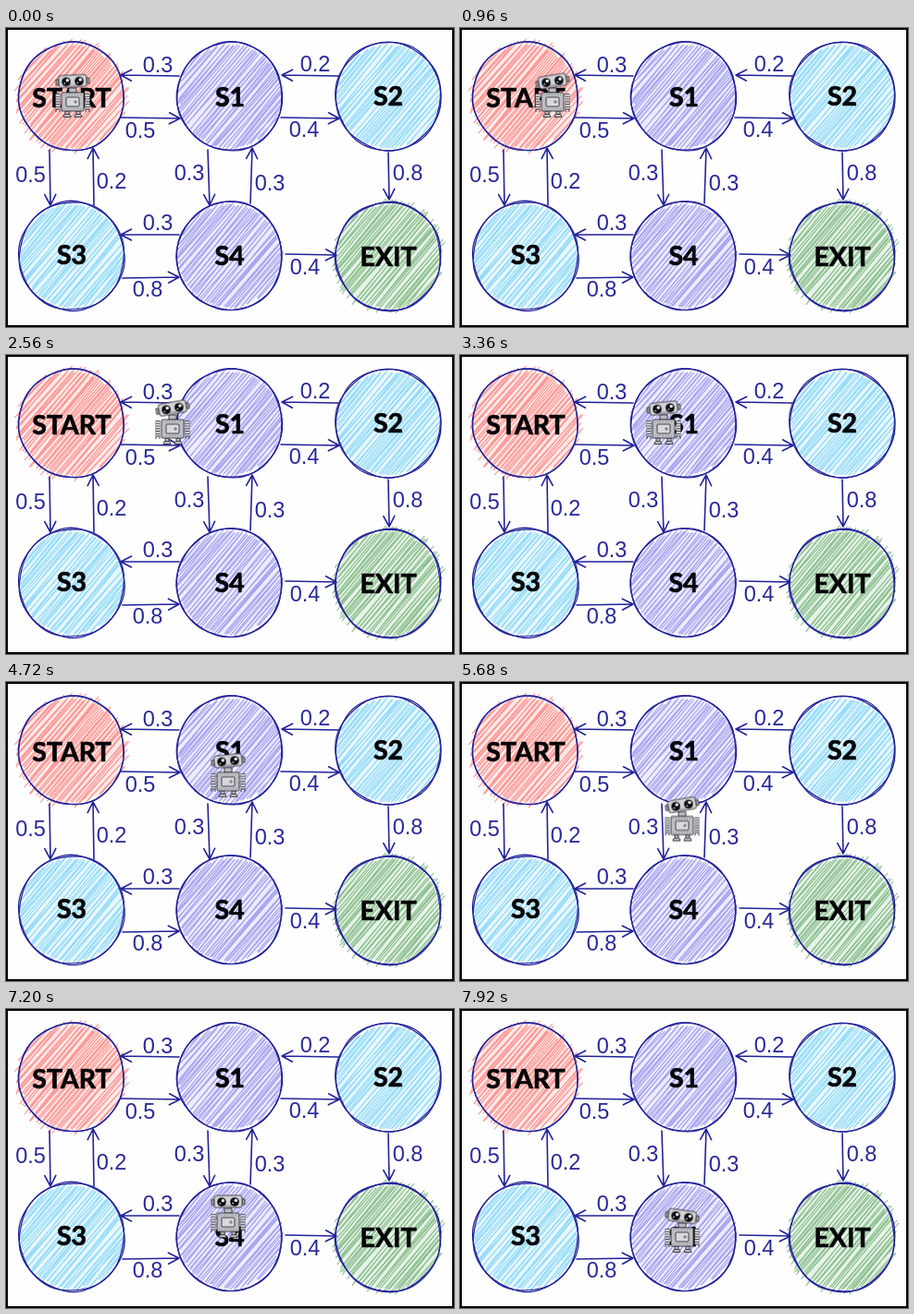
Write an HTML page that moves like this. It is 484 by 324 pixels and loops after 8 s.

```html
<!DOCTYPE html>
<html lang="en">
<head>
<meta charset="utf-8">
<title>State diagram</title>
<style>
html, body { margin: 0; width: 100%; height: 100%; overflow: hidden; background: #fefefe; }
svg { display: block; width: 484px; height: 324px; }
.ink { fill: none; stroke: #22229a; stroke-width: 1.6; stroke-linecap: round; stroke-linejoin: round; }
.ring { stroke-width: 1.3; }
.hatch { fill: none; stroke-width: 1.3; stroke-linecap: round; opacity: .55; }
text { text-anchor: middle; }
.state { font: 700 28.5px Lato, "Open Sans", sans-serif; fill: #050508; stroke: #050508; stroke-width: .7; }
.prob { font: 23.5px "Liberation Sans", Arial, sans-serif; fill: #29299a; }
#robot { animation: walk 8s -5ms infinite; }
#head { animation: tilt 8s -5ms infinite; }
@keyframes walk {
  0% { transform: translate(72px, 80px); animation-timing-function: step-end; }
  5% { transform: translate(72px, 80px); animation-timing-function: steps(42); }
  47% { transform: translate(240px, 80px); animation-timing-function: step-end; }
  52% { transform: translate(240px, 80px); animation-timing-function: steps(42); }
  94%, 100% { transform: translate(240px, 247px); animation-timing-function: step-end; }
}
@keyframes tilt {
  0% { transform: rotate(-3deg); animation-timing-function: steps(23); }
  23% { transform: rotate(-15deg); animation-timing-function: steps(19); }
  42% { transform: rotate(-6deg); animation-timing-function: steps(17); }
  59% { transform: rotate(-6deg); animation-timing-function: steps(12); }
  71% { transform: rotate(-10deg); animation-timing-function: steps(12); }
  83% { transform: rotate(-8deg); animation-timing-function: steps(16); }
  99%, 100% { transform: rotate(8deg); animation-timing-function: step-end; }
}
</style>
</head>
<body>
<svg viewBox="0 0 484 324">
  <g id="diagram"></g>
  <g id="robot" stroke="#34343c" stroke-width=".9">
    <g fill="#bcbcc2">
      <rect x="-4" y="-15" width="8" height="5"/>
      <path d="M-8 10h4v4h-4zM4 10h4v4h-4z"/>
      <path d="M-10 16.5q0-3 2-3h4q2 0 2 3zM2 16.5q0-3 2-3h4q2 0 2 3z"/>
    </g>
    <g fill="none">
      <path d="M-16 -9V8M16 -9V8" stroke="#55555d" stroke-width="5"/>
      <path d="M-16 -8V8M16 -8V8" stroke="#dcdce0" stroke-width="4.4" stroke-dasharray="1.7 1.1"/>
      <path d="M-18 11v-3h4v3M14 11v-3h4v3"/>
    </g>
    <rect x="-12" y="-10" width="24" height="20" rx="1" fill="#bebec4"/>
    <rect x="-7" y="-5" width="14" height="10" rx="1" fill="#d8d8dd"/>
    <path d="M1 0h4M3 -2v4" stroke="#66666e"/>
    <path d="M-10 -7.5h20M-10 7.5h20" stroke="#8a8a92" stroke-dasharray="1 2"/>
    <g transform="translate(0 -22)">
      <g id="head">
        <path d="M-18 -3h3v6h-3zM15 -3h3v6h-3z" fill="#a4a4ab"/>
        <rect x="-15" y="-7" width="30" height="13" rx="2.5" fill="#d2d2d7"/>
        <path d="M-4 4h8" stroke="#85858c"/>
        <g fill="#0a0a10" stroke="none">
          <circle cx="-7" r="4.8"/><circle cx="7" r="4.8"/>
        </g>
        <g fill="#fff" stroke="none">
          <circle cx="-5.6" cy="-1.6" r="1.7"/><circle cx="8.4" cy="-1.6" r="1.7"/>
          <circle cx="-8.8" cy="1.6" r=".8"/><circle cx="5.2" cy="1.6" r=".8"/>
        </g>
      </g>
    </g>
  </g>
  <path d="M0 0H484V324H0zM2 2V322H482V2z" fill="#000"/>
</svg>
<script>
const diagram = document.getElementById('diagram');
let seed = 17;
const rand = () => (seed = (seed * 16807) % 2147483647) / 2147483647;
const jitter = n => (rand() * 2 - 1) * n;

function add(tag, attrs, text) {
  const el = document.createElementNS('http://www.w3.org/2000/svg', tag);
  for (const key in attrs) el.setAttribute(key, attrs[key]);
  if (text) el.textContent = text;
  diagram.append(el);
}

// Slanted pen strokes across a disc, each drawn twice
function hatch(cx, cy, r, color, over) {
  const a = -50 * Math.PI / 180, ux = Math.cos(a), uy = Math.sin(a);
  let d = '';
  for (let off = 2 - r; off < r; off += 4.3) {
    const half = Math.sqrt(r * r - off * off);
    for (let pass = 0; pass < 2; pass++) {
      const o1 = off + jitter(2), o2 = off + jitter(2);
      const s = -half + 2 - rand() * over, e = half - 2 + rand() * over;
      d += `M${cx + ux * s - uy * o1} ${cy + uy * s + ux * o1}L${cx + ux * e - uy * o2} ${cy + uy * e + ux * o2}`;
    }
  }
  add('circle', { cx, cy, r: r - 1, fill: color, opacity: .12 });
  add('path', { d, class: 'hatch', stroke: color });
}

// Two slightly wobbly loops
function ring(cx, cy) {
  for (let pass = 0; pass < 2; pass++) {
    const p = rand() * 6, q = rand() * 6;
    let d = '';
    for (let a = 0; a < 6.28; a += .1) {
      const w = .6 * Math.sin(3 * a + p) + .4 * Math.sin(7 * a + q);
      d += `${d ? 'L' : 'M'}${cx + (56.8 + w) * Math.cos(a)} ${cy + (58.8 + w) * Math.sin(a)}`;
    }
    add('path', { d: d + 'z', class: 'ink ring' });
  }
}

function arrow(x1, y1, x2, y2) {
  const a = Math.atan2(y2 - y1, x2 - x1);
  const barb = side => `M${x2 - 13 * Math.cos(a + side)} ${y2 - 13 * Math.sin(a + side)}L${x2} ${y2}`;
  add('path', { d: `M${x1} ${y1}L${x2} ${y2}` + barb(.48) + barb(-.48), class: 'ink' });
}

const red = '#fb5a55', violet = '#736de8', sky = '#54c6f6', green = '#469a4a';
const states = [
  ['START', 71, 74, 85.5, red, 12], ['S1', 242, 74, 84.5, violet, 4], ['S2', 413, 74, 83.5, sky, 4],
  ['S3', 71, 247, 255.5, sky, 4], ['S4', 241.5, 247, 256.5, violet, 4], ['EXIT', 413, 247.5, 257.5, green, 11]
];
for (const [name, x, y, base, color, over] of states) {
  hatch(x, y, 56, color, over);
  ring(x, y);
  add('text', { x, y: base, class: 'state' }, name);
}

const links = [
  [187, 52, 124, 51, '0.3', 164, 47.5], [124, 97, 188, 98, '0.5', 145, 118.5],
  [359, 52, 298, 51, '0.2', 334, 46.5], [297, 97, 360, 98, '0.4', 322, 118],
  [47, 132, 48, 192, '0.5', 26.5, 166.5], [95, 192, 94, 130, '0.2', 114, 174],
  [218, 132, 220, 192, '0.3', 198, 165], [264, 190, 266, 130, '0.3', 285, 176],
  [413, 135, 414, 186, '0.8', 434, 165], [187, 224, 124, 224, '0.3', 164, 219],
  [126, 271, 187, 270, '0.8', 153, 290.5], [302, 245, 357, 246, '0.4', 323, 267]
];
for (const [x1, y1, x2, y2, label, x, y] of links) {
  arrow(x1, y1, x2, y2);
  add('text', { x, y, class: 'prob' }, label);
}
</script>
</body>
</html>
```
